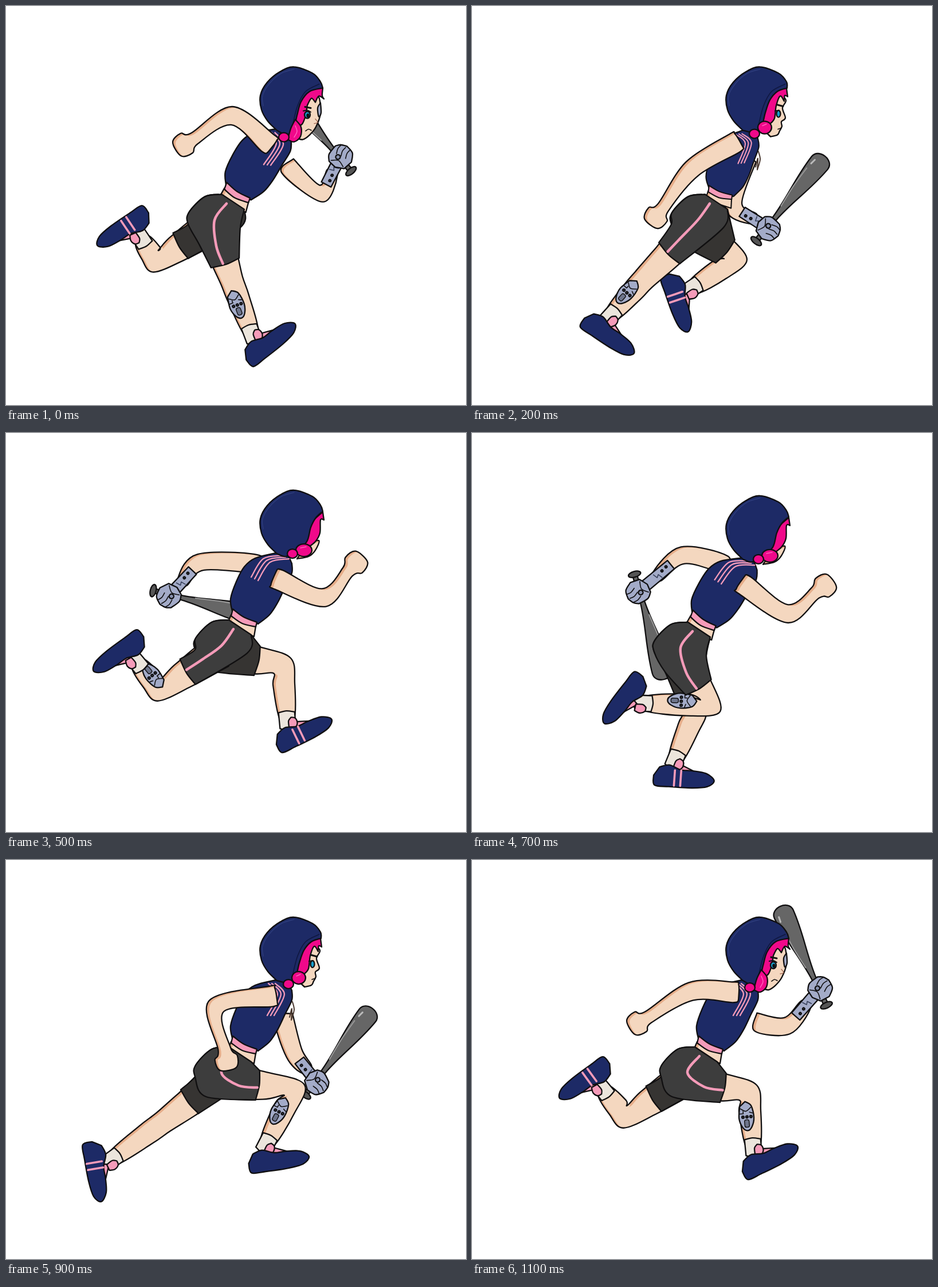
An HTML page for the animation above (1200 ms loop, 803 by 698 pixels).

```html
<!DOCTYPE html>
<html lang="en">
<head>
<meta charset="utf-8">
<title>Runner</title>
<style>
html, body { margin: 0; width: 100%; height: 100%; overflow: hidden; background: #fff; }
svg { display: block; width: 100vw; height: 100vh; }
</style>
</head>
<body>
<svg id="stage" viewBox="0 0 803 698" fill="none" stroke="#100f10" stroke-width="2.3" stroke-linejoin="round" stroke-linecap="round"></svg>
<script>
const NAVY = '#1d2a66', PINK = '#f59bb9', HAIR = '#f0098a', SKIN = '#f4d7bf', SHADE = '#e6ad89';
const METAL = '#a3abc8', SOCK = '#ebe5dc', SHORTS = '#3d3d3d', FAR_SHORTS = '#363432', BAT = '#666';
const STEPS = 12, STEP_MS = 100;

// Key poses of one stride: step, then joint positions. Steps between are interpolated.
// Both legs share one cycle, half a stride apart: knee, ankle, foot angle.
const legKeys = [
  [0, 394, 480, 429, 573, -40], [1, 390, 486, 355, 571, 2], [2, 300, 478, 243, 541, 32],
  [3, 275, 458, 186, 523, 78], [5, 268, 449, 229, 402, 142], [6, 262, 446, 236, 407, 144],
  [7, 416, 477, 300, 473, 126], [8, 460, 443, 385, 493, 69], [9, 503, 402, 455, 496, -10],
  [11, 482, 407, 491, 502, -28]
];
// Elbow, hand.
const nearArmKeys = [
  [0, 394, 192, 312, 242], [2, 384, 285, 322, 368], [3, 490, 350, 549, 437], [5, 555, 288, 610, 228],
  [7, 551, 316, 615, 268], [8, 460, 340, 510, 388], [9, 367, 256, 385, 350], [11, 382, 230, 291, 285]
];
// Elbow, hand, bat angle.
const farArmKeys = [
  [0, 550, 328, 583, 266, -130], [2, 457, 350, 515, 388, -51], [3, 366, 255, 383, 348, -19],
  [5, 340, 226, 286, 283, 14], [7, 368, 214, 292, 276, 74], [9, 503, 338, 541, 387, -52], [11, 550, 290, 606, 227, -115]
];

const unit = (a, b) => {
  const n = Math.hypot(b[0] - a[0], b[1] - a[1]) || 1;
  return [(b[0] - a[0]) / n, (b[1] - a[1]) / n];
};
const add = (p, d, n = 1) => [p[0] + d[0] * n, p[1] + d[1] * n];
const lerp = (a, b, t) => [a[0] + (b[0] - a[0]) * t, a[1] + (b[1] - a[1]) * t];
const heading = (a, b) => Math.atan2(b[1] - a[1], b[0] - a[0]) * 180 / Math.PI;

// Periodic smooth interpolation of rows [step, ...values].
function sample(keys, step) {
  const t = (step + STEPS) % STEPS, count = keys.length;
  const row = i => {
    const lap = Math.floor(i / count), [time, ...values] = keys[i - lap * count];
    return { time: time + lap * STEPS, values };
  };
  const i = keys.findLastIndex(key => key[0] <= t);
  const [a, b, c, d] = [-1, 0, 1, 2].map(k => row(i + k));
  const span = c.time - b.time, u = (t - b.time) / span;
  return b.values.map((from, k) => {
    const to = c.values[k];
    const m0 = (to - a.values[k]) / (c.time - a.time) * span;
    const m1 = (d.values[k] - from) / (d.time - b.time) * span;
    const ease = u * u * (3 - 2 * u);
    return from + (to - from) * ease + m0 * u * (1 - u) ** 2 - m1 * u * u * (1 - u);
  });
}

const parse = text => text.split('/').map(run => run.trim().split(' ').map(p => p.split(',').map(Number)));

// Smooth curve through runs of points that meet in corners; a closed curve starts at its last point.
function curve(source, open) {
  const runs = typeof source === 'string' ? parse(source) : source;
  let last = open ? runs[0][0] : runs.at(-1).at(-1);
  let d = `M${last}`;
  runs.forEach((run, r) => {
    const pts = open && r === 0 ? run : [last, ...run];
    for (let i = 0; i < pts.length - 1; i++) {
      const a = pts[i], b = pts[i + 1], before = pts[i - 1] || a, after = pts[i + 2] || b;
      d += `C${add(a, [b[0] - before[0], b[1] - before[1]], 1 / 6)} ${add(b, [after[0] - a[0], after[1] - a[1]], -1 / 6)} ${b}`;
    }
    last = run.at(-1);
  });
  return open ? d : d + 'Z';
}

const shape = (source, fill) => `<path d="${curve(source)}" fill="${fill}"/>`;
const line = (source, color = '#100f10', width = 1.6) =>
  `<path d="${curve(source, true)}" stroke="${color}" stroke-width="${width}"/>`;
const oval = (x, y, rx, ry, fill) => `<ellipse cx="${x}" cy="${y}" rx="${rx}" ry="${ry}" fill="${fill}"/>`;
const place = ([x, y], inner, turn = 0, scale = 1) =>
  `<g transform="translate(${x} ${y}) rotate(${turn}) scale(${scale})">${inner}</g>`;

let clips = 0;
function skin(source) {
  const d = curve(source), id = `clip${clips++}`;
  return `<clipPath id="${id}"><path d="${d}"/></clipPath><path d="${d}" fill="${SHADE}" stroke="none"/>
    <g clip-path="url(#${id})"><path d="${d}" transform="translate(5 2)" fill="${SKIN}" stroke="none"/></g><path d="${d}"/>`;
}

// Outline around a chain of [point, half width].
function limb(...joints) {
  const left = [], right = [];
  joints.forEach(([p, width], i) => {
    const before = joints[i - 1]?.[0] || p, after = joints[i + 1]?.[0] || p;
    const along = unit([0, 0], add(unit(before, p), unit(p, after)));
    const normal = [-along[1], along[0]];
    left.push(add(p, normal, width));
    right.unshift(add(p, normal, -width));
  });
  return skin([[...left, ...right]]);
}

const shoe = shape('-35,46 -10,48 30,49 57,46 69,35 55,23 30,19 10,18 -10,10 -27,14 / -37,29', NAVY);
const bars = [0, 11].map(x => line(`${x},19 ${x - 1},46`, PINK, 3.6)).join('');
const sock = shape('-14,-14 / 0,-16 14,-13 / 14,14 / 0,18 -14,14', SOCK);
const tongue = shape('14,-2 17,7 13,16 / 2,14 / 2,2 7,-4', PINK);
const patch = shape('10,-18 13,3 8,19 0,25 -8,19 -13,3 -10,-18 / 0,-26', METAL) +
  line('-9,-14 0,-9 9,-15') + line('-11,-5 -5,-5 / -5,-9') + line('11,-5 6,-7') +
  [-6, 1, 8].map(x => oval(x, 1, 1.9, 1.9, '#59627d')).join('') +
  '<rect x="-4" y="6" width="8" height="13" rx="3" fill="#6d748b" stroke-width="1.4"/>';

function drawShorts(waist, hip, knee, near) {
  const along = unit(hip, knee), back = [-along[1], along[0]];
  const hem = add(hip, along, 66), rear = add(hem, back, 27), front = add(hem, back, -25);
  const seat = [add(waist, [-50, -8]), add(waist, [-78, 20]), add(waist, [-79, 40])];
  if (hem[0] > hip[0]) seat.push(add(waist, [-60, 75]));
  const inner = front[0] < waist[0] + 25 ? [add(waist, [12, 46])] : [];
  const outline = [[...seat, rear], [add(hem, along, 3), front], [...inner, add(waist, [19, 14])], [add(waist, [-20, -12])]];
  const stripe = [add(waist, [-12, 4]), add(hip, [2, -12]), add(lerp(hip, hem, .5), back, 6), add(hem, back, 5)];
  return shape(outline, near ? SHORTS : FAR_SHORTS) + (near ? line([stripe], PINK, 4.5) : '');
}

function drawLeg(step, waist, near) {
  const [kx, ky, ax, ay, footTurn] = sample(legKeys, step);
  const hip = add(waist, [-35, 45]), knee = [kx, ky], ankle = [ax, ay];
  const shinTurn = heading(knee, ankle) - 90;
  const along = unit(knee, ankle);
  const mark = add(lerp(knee, ankle, .43), [-along[1], along[0]], 7);
  return limb([hip, 28], [lerp(hip, knee, .6), 24], [knee, 20], [lerp(knee, ankle, .35), 19], [ankle, 12]) +
    (near ? place(mark, patch, shinTurn) : '') + place(ankle, sock, shinTurn) +
    place(ankle, shape('8,8 / 36,21 / 4,24', PINK), footTurn) + place(ankle, tongue, shinTurn) +
    place(ankle, shoe + (near ? '' : bars), footTurn) + drawShorts(waist, hip, knee, near);
}

function drawBat(hand, turn) {
  const body = `<path d="M-30-4H22C65-6 100-17 146-18C166-18 166 18 146 18C100 17 65 6 22 4H-30Z" fill="${BAT}"/>`;
  const shine = line('45,-5 85,-10 125,-12', '#989898', 2) + line('136,-11 145,-10', '#bbb', 3);
  return place(hand, body + shine + oval(-30, 0, 5, 11, '#555'), turn);
}

function drawMetal(elbow, hand) {
  const from = lerp(elbow, hand, .3), length = Math.hypot(hand[0] - from[0], hand[1] - from[1]);
  const forearm = `<path d="M-3-9L${length - 10}-10V10L-3 10Z" fill="${METAL}"/>` +
    oval(6, 3, 1.8, 1.8, '#55607e') + oval(16, 2, 1.8, 1.8, '#55607e') + line('23,-7 25,1 / 30,-2 / 32,6', '#39425c');
  const glove = shape('-3,-20 15,-17 / 21,-10 24,1 / 18,15 3,21 / -13,15 / -18,0 / -14,-14', METAL) +
    [-9, 0, 9].map(y => line(`4,${y} 13,${y - 2} 21,${y}`)).join('') +
    line('-11,-12 -5,0 -11,12') + oval(0, -4, 4, 4, '#8790ad');
  return place(from, forearm + place([length, 0], glove), heading(elbow, hand));
}

const faces = {
  front: {
    under: skin('548,160 549,182 541,205 530,219 518,227 508,225 / 508,180 520,150 545,150') +
      shape('550,180 546,187 544,172 549,163', METAL) +
      shape('552,150 555,156 / 546,151 540,162 / 533,155 526,167 / 523,185 517,200 508,205 / 500,195 510,160 528,140 553,137', HAIR) +
      oval(526, 184, 5, 6, '#18a0cd') + oval(527, 185, 1.5, 2.5, '#111') +
      line('519,177 526,176 532,179', '#111', 2) + line('522,170 532,172', '#111', 3) +
      line('523,212 528,209 533,211') + line('540,191 544,197 538,199', '#9c604c', 1.3),
    edge: '490,219 502,208 508,185 515,161 530,143 553,137',
    over: shape('515,205 514,222 503,231 492,227 / 497,208 505,192', HAIR) + oval(485, 223, 9, 8, HAIR) +
      line('505,203 508,213 503,223', '#ff61bc', 1.5),
    cord: '463,266 478,262 487,252' },
  profile: {
    under: skin('548,158 542,172 547,189 540,196 541,204 537,212 533,219 521,222 / 510,205 520,160 535,145') +
      shape('551,152 / 546,150 545,160 / 538,151 531,168 528,190 520,200 / 506,200 512,165 530,143 549,137', HAIR) +
      oval(535, 182, 3.5, 6, '#18a0cd') + line('529,177 536,176', '#111', 2) + line('532,166 543,169', '#111', 3) +
      line('534,209 540,207'),
    edge: '490,214 505,205 512,180 520,158 533,143 550,137',
    over: oval(511, 206, 12, 11, HAIR) + oval(493, 217, 9, 8, HAIR) + line('507,203 514,200', '#ff61bc', 1.5),
    cord: '500,248 503,262 498,280 / 499,260 495,275' },
  hidden: {
    under: skin('546,188 540,205 528,216 508,220 / 525,195') +
      shape('555,152 / 549,152 548,175 540,190 525,202 / 520,185 530,160 553,138', HAIR),
    edge: '488,216 505,208 525,190 532,165 541,148 553,137',
    over: oval(520, 205, 14, 11, HAIR) + oval(500, 211, 9, 8, HAIR) + line('514,201 524,199', '#ff61bc', 1.5),
    cord: '486,272 495,266' }
};

function drawHead(face) {
  const hood = '549,126 535,111 503,100 479,108 456,127 444,150 446,175 457,195 473,211 / ' + face.edge;
  const rim = face === faces.hidden ? '' : line('547,130 523,143 509,168 500,203', '#0f1740');
  return face.under + shape(hood, NAVY) + line('449,168 448,150 460,129 481,111 503,104', '#304080', 1.2) + rim + face.over;
}

// The torso is drawn around its waist and swung so that it reaches the neck.
const WAIST = [414, 326], NECK = [482, 213];
const belly = skin('436,338 / 433,356 / 386,334 / 393,318');
function drawTorso(armForward) {
  const strand = armForward ? '488,217 455,223 434,255' : '464,216 480,235 462,272';
  return shape('490,213 499,228 / 499,245 487,270 474,297 460,318 440,334 / 415,326 395,312 / 392,290 402,260 416,234 435,219 470,210', NAVY) +
    [-6, 0, 6].map(d => place([d, armForward ? d / 2 : 0], line(strand, PINK, 2.3))).join('') +
    shape('415,322 438,331 / 436,339 / 412,333 393,320 / 396,308', PINK);
}

function drawPose(step) {
  const phase = step % 6;
  const bob = 3.3 + 6.5 * Math.cos((phase - 1) * Math.PI / 3);
  const lean = [402, 402, 432][phase] || WAIST[0];
  const waist = [lean, WAIST[1] + bob * .4], neck = add(NECK, [0, bob]);
  const hips = add(waist, [-5, 13]);

  const [ex, ey, hx, hy] = sample(nearArmKeys, step);
  const elbow = [ex, ey], hand = [hx, hy];
  const reach = (hx - 300) / 300;
  const shoulder = [456 + 20 * reach, 232 + 24 * reach + bob];
  const aim = unit(elbow, hand);

  const [fx, fy, gx, gy, batTurn] = sample(farArmKeys, step);
  const farElbow = [fx, fy], grip = [gx, gy];
  const farReach = (gx - 285) / 300;
  const farShoulder = [442 + 50 * farReach, 230 + 50 * farReach];

  const face = hx < 315 ? faces.front : hx < 570 ? faces.profile : faces.hidden;
  const swing = heading(waist, neck) - heading(WAIST, NECK);
  const stretch = Math.hypot(neck[0] - waist[0], neck[1] - waist[1]) / Math.hypot(NECK[0] - WAIST[0], NECK[1] - WAIST[1]);
  const onWaist = inner => place(waist, place([-WAIST[0], -WAIST[1]], inner), swing, stretch);
  const onHead = inner => place([0, bob], inner);

  return drawBat(grip, batTurn) +
    limb([farShoulder, 16], [farElbow, 15], [lerp(farElbow, grip, .6), 10]) + drawMetal(farElbow, grip) +
    drawLeg(step + 6, hips, false) + onWaist(belly) + drawLeg(step, hips, true) +
    onHead(line(face.cord, '#49382f', 2)) + onWaist(drawTorso(reach > .5)) + onHead(drawHead(face)) +
    limb([add(shoulder, unit(elbow, shoulder), 10), 13], [shoulder, 18], [elbow, 16],
      [add(hand, aim, -20), 11], [add(hand, aim, -4), 20], [add(hand, aim, 16), 14]);
}

const stage = document.getElementById('stage');
stage.innerHTML = Array.from({ length: STEPS }, (_, step) => `<g>${drawPose(step)}</g>`).join('');
const groups = [...stage.children];

function render(time) {
  const current = Math.floor(time / STEP_MS) % STEPS;
  groups.forEach((group, i) => group.style.display = i === current ? '' : 'none');
}

const start = performance.now();
function tick() {
  render(performance.now() - start);
  requestAnimationFrame(tick);
}
tick();
</script>
</body>
</html>
```
